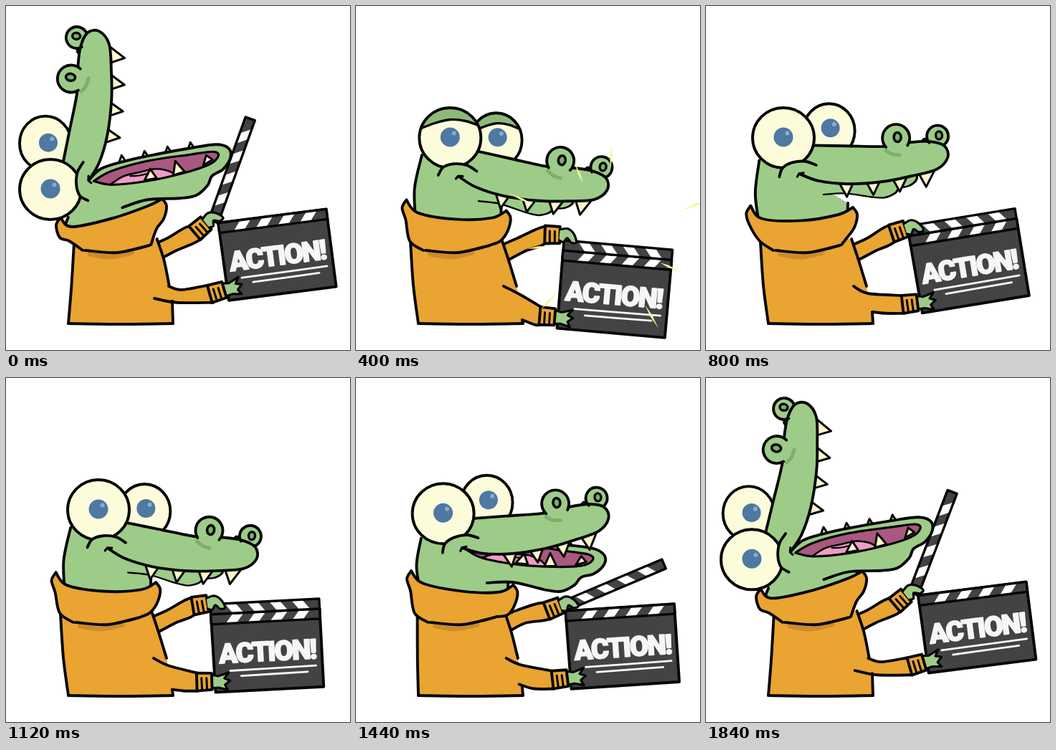
An HTML page with a canvas that plays this animation: 480x480 px, repeating every 1.92 s.

```html
<!DOCTYPE html>
<html lang="en">
<head>
<meta charset="utf-8">
<title>Crocodile with clapperboard</title>
<style>
  html, body { margin: 0; width: 100%; height: 100%; overflow: hidden; background: #fff; }
  canvas { display: block; width: 480px; height: 480px; }
</style>
</head>
<body>
<canvas id="stage" width="480" height="480"></canvas>
<script>
const ctx = document.getElementById('stage').getContext('2d');
const STEP = 80, STEPS = 24, RAD = Math.PI / 180;
const INK = '#050505', GREEN = '#9dcc89', LID = '#8dba79', SHADE = '#7fae6d',
  ORANGE = '#e9a431', FOLD = '#cc8b2c', CREAM = '#fdfcda', TOOTH = '#fdf6cf',
  BLUE = '#4f78a2', SLATE = '#434345', CHALK = '#f6f6f6';

const mix = (a, b, k) => a + (b - a) * k;
function ease(t, from, to) {
  const k = Math.max(0, Math.min(1, (t - from) / (to - from)));
  return k * k * (3 - 2 * k);
}
function shift(x, y, deg, dx, dy) {
  const c = Math.cos(deg * RAD), s = Math.sin(deg * RAD);
  return [x + dx * c - dy * s, y + dx * s + dy * c];
}

// The whole pose follows from four signals: throw, nod, tilt and lid.
function poseAt(step) {
  const t = step < 2 ? step + STEPS : step;
  const slam = ease(t, 24, 26);
  const b = (.95 * ease(t, 16.5, 22) + .05 * ease(t, 22, 24)) * (1 - slam);
  const nod = (15.5 - 18 * ease(t, 3, 8) + 10.5 * ease(t, 10, 14) + 7.5 * slam) * (1 - b);
  const tilt = 5 - 14.3 * ease(t, 5, 10) + 6.3 * ease(t, 10, 14) + 8 * slam - 4.3 * b;
  const lid = slam + 1 - ease(t, 4, 6);
  const open = Math.min(1, b / .18), fall = b ** 1.5;

  const eye = [mix(113 + 2 * nod, 62, fall), mix(184, 256, fall)];
  const rot = nod - 82 * b;
  const board = [287 + .4 * tilt + 6 * open + 6 * b, 334 + 1.4 * tilt - 21 * b];
  return {
    step, b, lid, open, eye, rot, tilt, board,
    lean: 8 * open + 11 * b,
    jaw: mix(12, 0, b) + .9 * nod,
    head: (x, y) => shift(...eye, rot, x - 114, y - 184),
    left: [60 + .7 * nod + 8 * open + 4 * b, 278 - .7 * nod - 8 * open + 26 * b],
    right: [211 + .4 * nod + 11 * open + b, 286 + .4 * nod + 8 * open - 21 * b],
    stick: tilt - 63 * b ** .68,
    farWrist: [board[0] - 5 - 12 * b, board[1] - 17 - .8 * tilt + 6 * open + 6 * b],
    farTurn: -3 + 1.4 * tilt - 8 * open - 17 * b,
    nearWrist: shift(...board, tilt, -4, 94),
    nearTurn: 3 + .8 * tilt - 3 * open - 8 * b
  };
}

// Flat x,y list to a curve through every point.
function curve(p, path = new Path2D(), join = false) {
  const n = p.length / 2;
  const at = i => { i = Math.max(0, Math.min(n - 1, i)); return [p[2 * i], p[2 * i + 1]]; };
  join ? path.lineTo(p[0], p[1]) : path.moveTo(p[0], p[1]);
  for (let i = 0; i < n - 1; i++) {
    const [a, b, c, d] = [at(i - 1), at(i), at(i + 1), at(i + 2)];
    path.bezierCurveTo(b[0] + (c[0] - a[0]) / 6, b[1] + (c[1] - a[1]) / 6,
      c[0] - (d[0] - b[0]) / 6, c[1] - (d[1] - b[1]) / 6, c[0], c[1]);
  }
  return path;
}
function shape(...p) {
  const path = new Path2D();
  for (let i = 0; i < p.length; i += 2) path.lineTo(p[i], p[i + 1]);
  path.closePath();
  return path;
}
function oval(x, y, rx, ry = rx, from = 0, to = 360) {
  const path = new Path2D();
  path.ellipse(x, y, rx, ry, 0, from * RAD, to * RAD);
  return path;
}
function paint(path, fill, width = 3.9, color = INK) {
  if (fill) { ctx.fillStyle = fill; ctx.fill(path); }
  if (width) { ctx.lineWidth = width; ctx.strokeStyle = color; ctx.stroke(path); }
}
const ink = (p, width, color) => paint(curve(p), null, width, color);
function placed(x, y, deg, draw, sx = 1, sy = 1) {
  ctx.save();
  ctx.translate(x, y);
  ctx.rotate(deg * RAD);
  ctx.scale(sx, sy);
  draw();
  ctx.restore();
}

function stripes(y, top, low) {
  const bar = shape(0, y, 152, y, 152, y + 14, 0, y + 14);
  paint(bar, SLATE, 0);
  for (let x = 20; x < 140; x += 31) {
    paint(shape(x + top, y, x + top + 15, y, x + low + 15, y + 14, x + low, y + 14), '#fff', 0);
  }
  paint(bar, null, 3.4);
}
function lettering() {
  const font = size => `condensed 800 ${size}px Roboto, 'Open Sans', sans-serif`;
  ctx.letterSpacing = '-2px';
  ctx.font = font(40);
  ctx.font = font(Math.min(50, 40 * 136 / ctx.measureText('ACTION!').width));
  ctx.textAlign = 'center';
  ctx.fillStyle = CHALK;
  ctx.fillText('ACTION!', 76, 69);
  ctx.lineWidth = 1.8;
  ctx.strokeStyle = CHALK;
  ctx.strokeText('ACTION!', 76, 69);
}
function drawBoard({ board, tilt, stick }) {
  placed(...board, tilt, () => {
    paint(shape(0, 0, 152, 0, 152, 109, 1, 109), SLATE);
    stripes(0, 11, 0);
    ink([23, 80, 143, 79], 2.8, CHALK);
    ink([38, 88, 131, 87], 2.8, CHALK);
    lettering();
  });
  placed(...board, stick, () => stripes(-14, 0, 11));
}

function cuff(x, y, turn) {
  placed(x, y, turn, () => {
    paint(shape(-21, -12, 0, -12, 1, 11, -20, 13), ORANGE);
    for (const r of [-14, -7]) ink([r, -5, r + 1, 11], 3);
  });
}
function drawFarArm({ farWrist: w, farTurn: turn }) {
  const p = shift(...w, turn, -20, -11), q = shift(...w, turn, -19, 12);
  paint(curve([198, 336, 225, 324, ...p, ...q, 236, 342, 208, 357]), ORANGE);
  cuff(...w, turn);
}
function drawFarHand({ farWrist, farTurn }) {
  placed(...farWrist, farTurn, () =>
    paint(curve([0, -8, 11, -10, 20, -3, 24, 8, 17, 9, 11, 3, 6, 9, 0, 7]), GREEN, 3.2));
}
function drawNearArm({ nearWrist: w, nearTurn: turn, b }) {
  const p = shift(...w, turn, -20, -12), q = shift(...w, turn, -19, 13);
  const top = [mix(206, 227, b), 391, mix(226, 245, b), mix(401, 396, b), ...p];
  const low = [...q, mix(250, 238, b), q[1], mix(232, 207, b), mix(Math.min(438, q[1] - 2), 408, b)];
  const arm = curve(top);
  curve(low, arm, true);
  paint(arm, ORANGE, 0);
  ink(top);
  ink(low);
  ink([233, 443, 232, Math.min(438, q[1] - 2)]);
  placed(...w, turn, () =>
    paint(shape(-1, -10, 9, -8, 24, -13, 18, -5, 26, -2, 19, 4, 23, 11, 10, 8, -1, 9), GREEN, 3.2));
  cuff(...w, turn);
}

function drawBody({ lean }) {
  const side = [76 + lean, 330, 80 + lean * .6, 390, 87, 443];
  const flank = [224 + lean * .2, 391, 213 + lean * .4, 355, 203 + lean * .4, 325];
  const body = curve(side);
  body.lineTo(233, 443);
  curve(flank, body, true);
  paint(body, ORANGE, 0);
  ink(side);
  ink([87, 443, 160, 444, 233, 443]);
  ink(flank);
}
function drawCollar({ left: [lx, ly], right: [rx, ry], lean, b }) {
  const k = lean * .7, sag = 17 - 5 * b;
  const rim = [lx + 4, ly - 1, lx + 20, ly + sag, (lx + rx) / 2, (ly + ry) / 2 + sag, rx - 25, ry + 6, rx - 5, ry - 4];
  const roll = [94 + k, 341, 75 + k, 328, lx + 3, ly + 27, lx - 2, ly + 10, lx + 4, ly - 1];
  const tuck = [rx - 5, ry - 4, rx + 1, ry + 6, rx - 3, ry + 24, rx - 13, ry + 38, 189 + k, 333];
  const cloth = curve(roll);
  curve(rim, cloth, true);
  curve(tuck, cloth, true);
  paint(cloth, ORANGE, 0);
  ink([104 + k, 346, 132 + k, 350, 162 + k, 344], 7, FOLD);
  for (const p of [roll, rim, tuck]) ink(p);
  ink([97 + k, 341, 142 + k, 344, 187 + k, 334]);
}

// A tooth stands on its base from (x, y) to (x + w, y + dy).
const tooth = (x, y, w, dy, tipX, tipY) => paint(shape(x, y, tipX, tipY, x + w, y + dy), TOOTH, 3);

function drawNeck({ head, left: [lx, ly], right: [rx, ry] }) {
  const a = head(79, 214), foot = [lx + 17, ly + 30], heel = [rx - 13, ry + 20];
  const side = [...a, (a[0] + foot[0]) / 2 - 6, (a[1] + foot[1]) / 2, ...foot];
  const neck = curve(side);
  for (const p of [heel, [rx - 12, ry - 10], head(134, 235), head(150, 205)]) neck.lineTo(...p);
  paint(neck, GREEN, 0);
  ink(side);
  ink([...heel, rx - 12, ry - 10]);
}
function drawMouth() {
  const mouth = curve([125, 239, 150, 225, 200, 211, 260, 202, 292, 198, 299, 204, 286, 216,
    250, 228, 200, 239, 150, 244, 125, 239]);
  paint(mouth, '#a9587f', 0);
  ctx.save();
  ctx.clip(mouth);
  paint(curve([140, 250, 165, 233, 188, 227, 212, 222, 234, 227, 238, 240, 200, 252]), '#f09cc6', 2.6);
  ink([176, 232, 190, 231, 203, 228], 2.2);
  ctx.restore();
  paint(mouth, null, 3.2);
}
function drawJaw({ head, jaw, open }) {
  const gape = open > .15;
  placed(...head(134, 235), jaw, () => {
    ctx.translate(-118, -238);
    if (gape) for (let i = 0; i < 4; i++) {
      const x = 159 + i * 32, y = 217 - i * 6;
      tooth(x, y, 13, -2, x + 5, y - 14);
    }
    paint(curve([118, 238, 135, 222, 165, 212, 200, 204, 260, 193, 296, 188, 313, 193, 316, 206,
      306, 222, 290, 232, 284, 245, 268, 259, 245, 263, 200, 265, 165, 276]), GREEN);
    if (!gape) return;
    drawMouth();
    tooth(196, 238, 17, -3, 204, 222);
    tooth(236, 231, 16, -5, 239, 211);
    tooth(278, 217, 13, -8, 282, 203);
  }, mix(.82, 1, open), mix(.6, 1, open));
}

function drawEye(x, y, rx, ry, px, py, pr, lid) {
  placed(x, y, 0, () => {
    const ball = oval(0, 0, rx, ry);
    paint(ball, lid < 1 ? CREAM : LID, 0);
    if (lid < 1) {
      paint(oval(px, py, pr), BLUE, 0);
      paint(oval(px + pr * .4, py - pr * .4, 3), '#8aaccb', 0);
    }
    if (lid > 0) {
      ctx.save();
      ctx.clip(ball);
      const low = mix(-ry, 3, lid);
      const edge = [-rx - 2, low + 8, -rx / 2, low - 1, 0, low - 6, rx / 2, low - 4, rx + 2, low + 4];
      const cover = curve(edge);
      cover.lineTo(rx + 2, -ry - 4);
      cover.lineTo(-rx - 2, -ry - 4);
      paint(cover, LID, 0);
      ink(edge, 3.4);
      ctx.restore();
    }
    paint(ball);
  });
}
function drawSnout() {
  ctx.translate(-114, -184);
  paint(oval(329, 191, 15), GREEN);
  paint(oval(331, 190, 4.5, 5.5), SHADE, 3.4);
  for (let i = 0; i < 4; i++) {
    const x = 189 + i * 37, y = 250 - i * i;
    tooth(x, y, 20 + i, -i, x + 10, 270 - i * i);
  }
  const edge = curve([150, 196, 200, 199, 255, 202, 291, 198, 318, 198, 338, 205, 342, 221,
    326, 237, 290, 245, 250, 251, 200, 252, 160, 246, 134, 235]);
  const snout = new Path2D(edge);
  snout.lineTo(106, 228);
  paint(snout, GREEN, 0);
  paint(edge);
  paint(oval(271, 191, 19), GREEN, 0);
  ink([256, 208, 264, 213, 275, 215], 5, SHADE);
  paint(oval(271, 191, 19, 19, 140, 395));
  paint(oval(273, 190, 5, 6.5), SHADE, 3.6);
  ink([317, 200, 311, 194, 307, 197], 3.2);
  ink([131, 239, 134, 235, 140, 234], 3.2);
}
function drawBrow() {
  ctx.translate(-114, -184);
  paint(curve([106, 238, 111, 226, 125, 219, 143, 218, 158, 224]), GREEN);
}

function drawSparks({ step }) {
  const age = step - 2;
  if (age < 0 || age > 3) return;
  const reach = 1.08 - .4 * .25 ** age, width = 5.5 - 1.3 * age;
  [-113, -87, -21, 24, 60, 133, 173, 205].forEach((angle, i) => {
    const to = (122 + 20 * Math.sin(i * 2.3 + 4)) * reach;
    const from = to * (.3 + .15 * age), mid = mix(from, to, .45);
    placed(350, 325, angle, () => {
      paint(shape(from, 0, mid, -width, to, 0, mid, width), '#f8ef80', 0);
      paint(shape(from, 0, mid, -width * .4, to - 14, 0, mid, width * .4), '#fffef0', 0);
    });
  });
  if (age < 2) for (let i = 0; i < 7; i++) {
    placed(345, 325, i * 53 - 70, () => paint(shape(6, 0, 20, -2, 42 + i % 3 * 9, 0, 20, 2), '#fff9bd', 0));
  }
}

function draw(step) {
  const pose = poseAt(step), { b, eye, rot, lid } = pose;
  const [farX, farY] = pose.head(178, 177);
  ctx.fillStyle = '#fff';
  ctx.fillRect(0, 0, 480, 480);
  drawFarArm(pose);
  drawBoard(pose);
  drawFarHand(pose);
  drawBody(pose);
  drawEye(farX - 9 * b, farY, 36, 38, 2 + 2 * b, -4 + 3 * b, 13, lid);
  drawNeck(pose);
  drawCollar(pose);
  drawJaw(pose);
  placed(...eye, rot, drawSnout);
  drawEye(...eye, 43, 42, 0, -1, 13.5, lid);
  placed(...eye, rot, drawBrow);
  drawNearArm(pose);
  drawSparks(pose);
}

ctx.lineCap = ctx.lineJoin = 'round';
const begin = performance.now();
function frame() {
  draw(Math.floor((performance.now() - begin) / STEP) % STEPS);
  requestAnimationFrame(frame);
}
frame();
</script>
</body>
</html>
```
